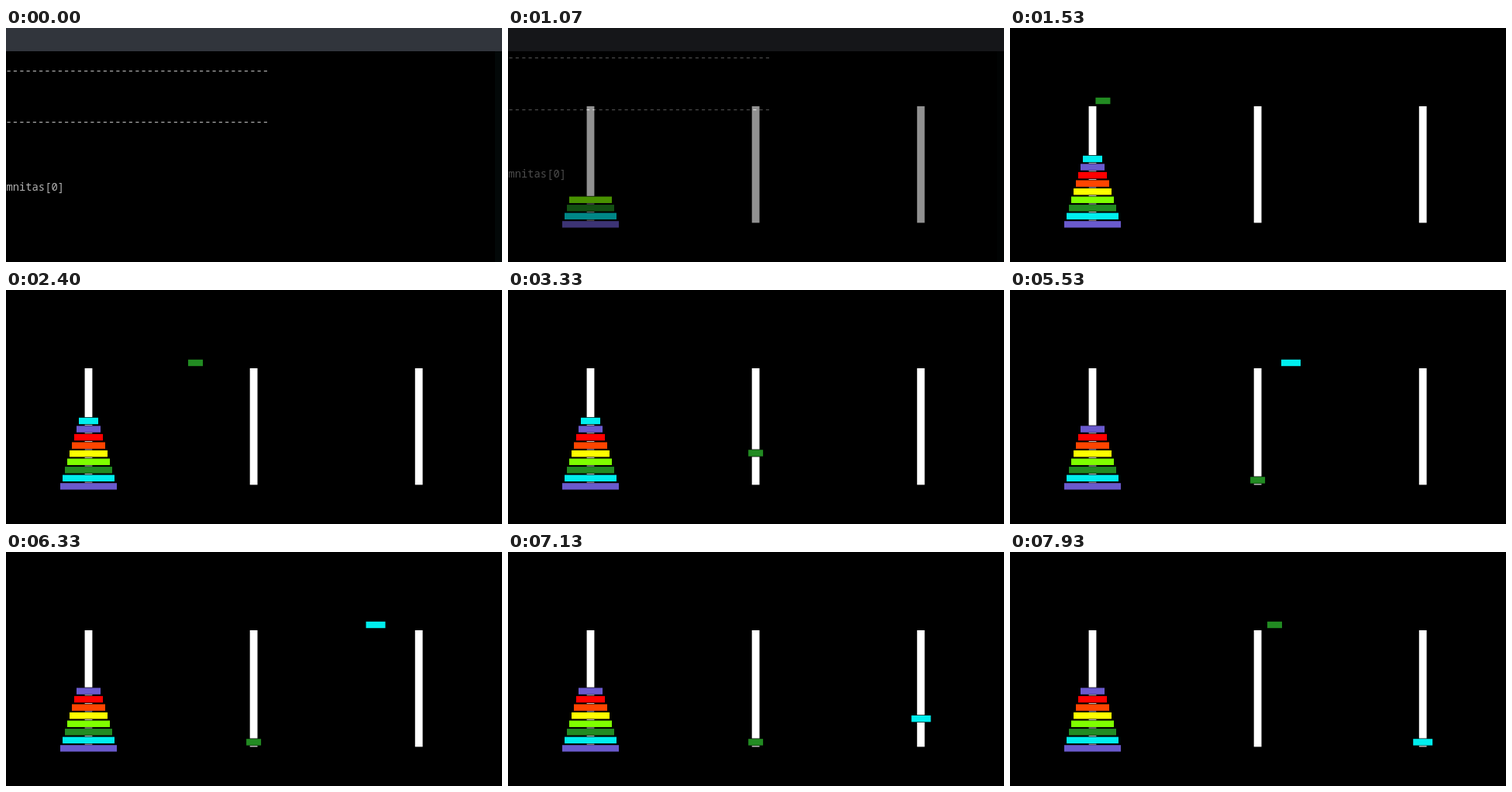
Write an HTML page that moves like this. It is 640 by 302 pixels and loops after 8000 ms.

```html
<!DOCTYPE html>
<html lang="en">
<head>
<meta charset="utf-8">
<title>Towers of Hanoi</title>
<style>
  html, body { margin: 0; width: 100%; height: 100%; overflow: hidden; background: #000; }
  svg { display: block; width: 100%; height: 100%; }
  text { font: 13.8px "Noto Sans Mono", monospace; fill: #b2b2b2; text-anchor: end; }
</style>
</head>
<body>
<svg viewBox="0 0 640 302">
  <rect width="640" height="302"/>
  <g id="terminal">
    <rect x="631" y="30" width="9" height="272" fill="#030808"/>
    <g id="output">
      <text class="rule" x="339" y="60"></text>
      <text class="rule" x="339" y="126.4"></text>
      <text x="75" y="209.6">mnitas[0]</text>
    </g>
    <rect width="640" height="30" fill="#31353c"/>
  </g>
  <g id="game"><rect width="640" height="302"/></g>
</svg>
<script>
const LOOP = 8000, STEP = 1000 / 15;
const PEGS = [106.5, 319.6, 532.7];
const LANE = 89.8, FLOOR = 241.2, DISK_HEIGHT = 8.4;
const COLORS = ['#6a5acd', '#00eeee', '#228b22', '#7fff00', '#ffff00',
                '#ff4500', '#ff0000', '#6a5acd', '#00eeee', '#228b22'];
const slotY = i => 249.2 - 10.55 * i;

// Disk paths: [step, centre x, top y]
const PATHS = {
  9: [[18.3, PEGS[0], slotY(9)], [21.6, PEGS[0], LANE], [36, 244.5, LANE], [44, PEGS[1], LANE],
      [51.8, PEGS[1], FLOOR], [109.1, PEGS[1], FLOOR], [116.6, PEGS[1], LANE], [119, 341.5, LANE]],
  8: [[52, PEGS[0], slotY(8)], [55.8, PEGS[0], LANE], [63, 175, LANE], [83, 362.5, LANE],
      [95, 477, LANE], [101, 534.5, LANE], [108.5, PEGS[2], FLOOR]]
};
const FADE = [[14, 0], [16, 0.57], [17.5, 1]];

function sample(keys, t) {
  if (t <= keys[0][0]) return keys[0].slice(1);
  const next = keys.findIndex(key => key[0] > t);
  if (next < 0) return keys[keys.length - 1].slice(1);
  const a = keys[next - 1], b = keys[next];
  const p = (t - a[0]) / (b[0] - a[0]);
  return a.slice(1).map((v, i) => v + (b[i + 1] - v) * p);
}

const byId = id => document.getElementById(id);
const game = byId('game');

function addRect(parent, attrs) {
  const rect = document.createElementNS('http://www.w3.org/2000/svg', 'rect');
  for (const name in attrs) rect.setAttribute(name, attrs[name]);
  parent.append(rect);
  return rect;
}

function addDisk(color, i) {
  const width = 73 - 6 * i;
  const group = document.createElementNS('http://www.w3.org/2000/svg', 'g');
  game.append(group);
  // Thin black edge separates the disk from the peg behind it
  addRect(group, { x: -width / 2 - 0.7, y: -0.7, width: width + 1.4, height: DISK_HEIGHT + 1.4 });
  addRect(group, { x: -width / 2, width, height: DISK_HEIGHT, fill: color });
  return group;
}

for (const x of PEGS) addRect(game, { x: x - 4.9, y: 101, width: 9.8, height: 150.4, fill: '#fff' });
const disks = COLORS.map(addDisk);
document.querySelectorAll('.rule').forEach(rule => rule.textContent = '-'.repeat(44));

function draw(ms) {
  const step = Math.floor((ms % LOOP + 5) / STEP);
  byId('output').setAttribute('transform', `translate(0 ${step < 14 ? 0 : -16.6})`);
  game.setAttribute('opacity', sample(FADE, step)[0]);
  const count = 3 * (step - 15) + 1;
  disks.forEach((disk, i) => {
    const [x, y] = PATHS[i] ? sample(PATHS[i], step) : [PEGS[0], slotY(i)];
    disk.setAttribute('transform', `translate(${x} ${y})`);
    disk.setAttribute('visibility', i < count ? 'visible' : 'hidden');
  });
}

const start = performance.now();
function tick() {
  draw(performance.now() - start);
  requestAnimationFrame(tick);
}
tick();
</script>
</body>
</html>
```
